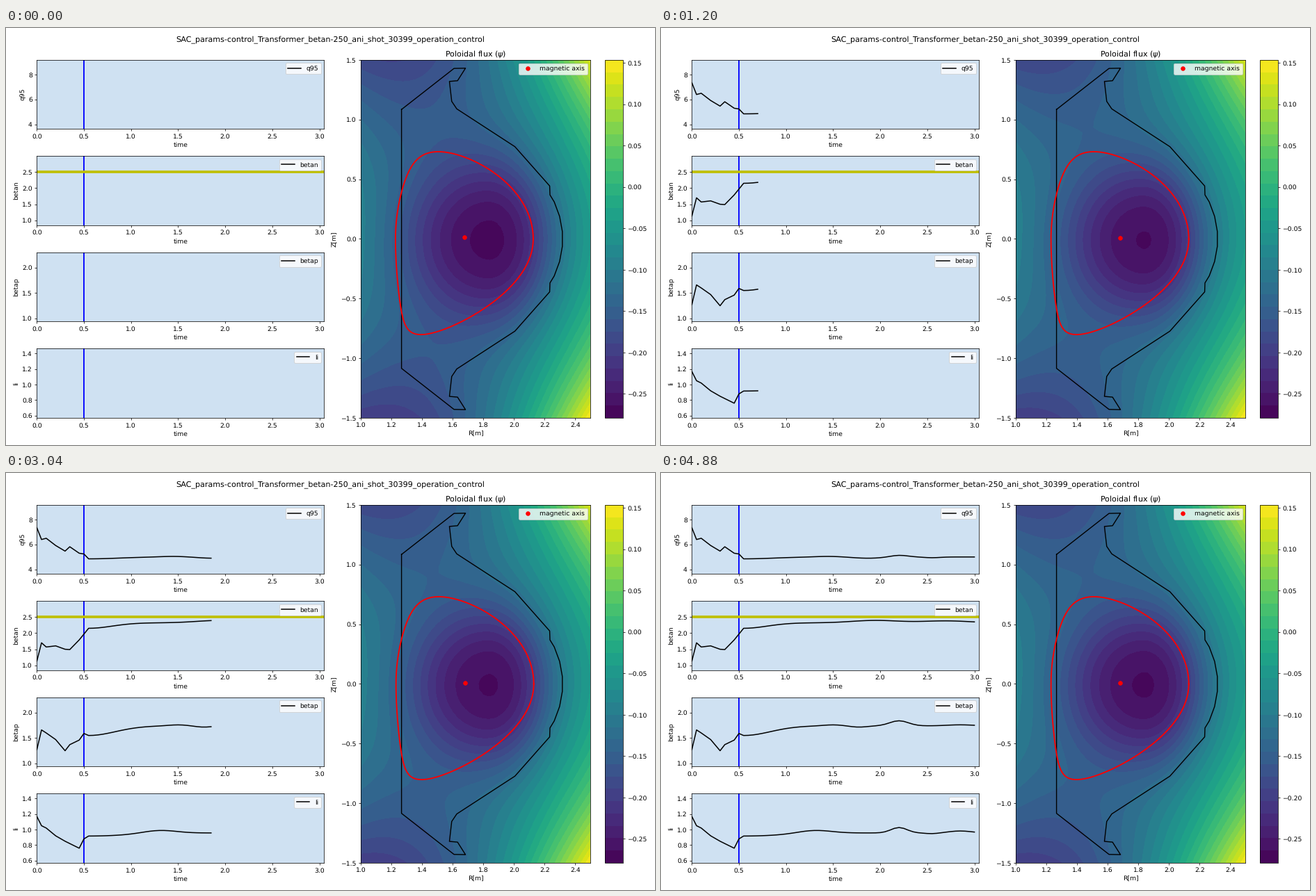
Animation, 933 px wide and 600 px high, one loop 4.96 s. Source, as a matplotlib script:

```python
import numpy as np
import matplotlib.pyplot as plt
from matplotlib.animation import FuncAnimation

FRAMES = 62
W, H = 933.38, 600.03
LOW, HIGH = -0.279, 0.1537
LEVELS = np.linspace(LOW, HIGH, 30)
TIME = np.arange(FRAMES - 1) * 0.05
START = [0, 0.05, 0.1, 0.2, 0.3, 0.35, 0.45, 0.5, 0.55]

# Upper half of the limiter; the lower half mirrors it
WALL = np.array([
    (1.265, 1.085), (1.608, 1.429), (1.683, 1.431), (1.631, 1.326),
    (1.578, 1.32), (1.593, 1.153), (1.626, 1.09), (2.006, 0.773),
    (2.233, 0.444), (2.235, 0.369), (2.263, 0.31), (2.298, 0.189),
    (2.316, 0.062)])


def bump(center, width):
    return np.exp(-((TIME - center) / width)**2)


def trace(start, base, gain, width, ripple):
    """Jagged ramp-up, then a smooth rise with ripples on top."""
    flat = base + gain * (1 - bump(0.55, width)) + ripple
    return np.where(TIME < 0.54, np.interp(TIME, START, start), flat)


SIGNALS = {
    "q95": trace([7.35, 6.4, 6.5, 5.92, 5.47, 5.82, 5.3, 5.24, 4.86],
                 4.85, 0.15, 0.45,
                 0.05 * bump(1.45, 0.2) - 0.1 * bump(1.87, 0.22)
                 + 0.14 * bump(2.2, 0.13) - 0.06 * bump(2.55, 0.12)),
    "betan": trace([1.13, 1.7, 1.57, 1.605, 1.5, 1.49, 1.79, 1.97, 2.15],
                   2.15, 0.17, 0.35,
                   0.075 * bump(1.95, 0.35) + 0.06 * bump(2.7, 0.35)),
    "betap": trace([1.27, 1.66, 1.6, 1.47, 1.25, 1.37, 1.46, 1.59, 1.55],
                   1.55, 0.19, 0.4,
                   0.02 * bump(1.5, 0.15) - 0.025 * bump(1.77, 0.13)
                   + 0.1 * bump(2.2, 0.14) + 0.02 * bump(2.85, 0.2)),
    "li": trace([1.17, 1.05, 1.02, 0.92, 0.85, 0.82, 0.76, 0.88, 0.93],
                0.917, 0.04, 0.6,
                0.04 * bump(1.3, 0.25) + 0.07 * bump(2.2, 0.12)
                - 0.01 * bump(2.55, 0.1) + 0.025 * bump(2.85, 0.17)),
}


def px_axes(left, top, right, bottom):
    return fig.add_axes([left / W, 1 - bottom / H,
                         (right - left) / W, (bottom - top) / H])


def early(frame):
    """Strength of the start-up transient."""
    return np.interp(frame, [0, 5, 15], [0.7, 1, 0])


def boundary(frame):
    """D-shaped plasma edge, more pointed below than above."""
    a = np.linspace(0, 2 * np.pi, 240)
    upper = np.sin(a) > 0
    tilt = np.where(upper, 0.388, 0.681)
    r = (1.679 - 0.005 * early(frame) + 0.45 * np.cos(a + tilt * np.sin(a))
         + 0.013 * np.sin(2 * a)**2)
    return r, np.where(upper, 0.731, 0.802) * np.sin(a)


def psi(frame):
    """Plasma well sunk into a saddle-shaped vacuum field."""
    e = early(frame)
    floor = np.interp(frame, [0, 5, 15, 23, 38, 49, 61],
                      [0.026, 0.0335, 0.033, 0.026, 0.032, 0.0285, 0.031])
    s = R - 1
    field = (0.44 - 0.3 * s + 0.253 * s**2
             + Z**2 * (-0.107 + 0.104 * s + 0.06 * s**2)
             + Z * (0.012 - 0.02 * s)
             - 0.04 * e * np.sin(np.pi * s / 1.5))
    dr = R - 1.843
    dr = dr / np.where(dr < 0, 0.51, 0.375)
    dz = (Z + 0.01) / 0.655
    well = np.exp(-(np.hypot(dr, dz) / (1 + 0.05 * e))**2.6)
    u = field * (1 - well) + floor * well
    return LOW + (HIGH - LOW) * np.clip(u, 0.001, 0.999)


def draw_flux(frame):
    return ax.contourf(R, Z, psi(frame), levels=LEVELS, cmap="viridis")


plt.rcParams["text.hinting"] = "none"
fig = plt.figure(figsize=(14, 9), dpi=66.67)
fig.suptitle("SAC_params-control_Transformer_betan-250_ani_shot_30399"
             "_operation_control", y=0.981)

curves = []
for i, (name, values) in enumerate(SIGNALS.items()):
    top = 45.7 + 138.6 * i
    sub = px_axes(44.3, top, 457.3, top + 99.6)
    sub.set_facecolor("#cfe1f2")
    sub.axvline(0.5, color="b", lw=2)
    if name == "betan":
        sub.axhline(2.5, color="y", lw=4)
    line, = sub.plot([], [], "k", lw=1.65, label=name)
    curves.append((line, values))
    sub.set(xlim=(0, 3.05), ylim=(0.75 * values.min(), 1.25 * values.max()),
            xlabel="time", ylabel=name)
    sub.legend(loc="upper right")

R, Z = np.meshgrid(np.linspace(1, 2.5, 65), np.linspace(-1.5, 1.5, 65))
ax = px_axes(510.3, 46, 840.3, 561)
ax.set_title(r"Poloidal flux ($\psi$)")
flux = draw_flux(0)
bar = fig.colorbar(flux, cax=px_axes(861.3, 46, 887, 561),
                   ticks=np.linspace(-0.25, 0.15, 9))
bar.minorticks_off()

wall = np.vstack([WALL, WALL[::-1] * (1, -1), WALL[:1]])
ax.plot(*wall.T, "k")
edge, = ax.plot([], [], "r", lw=2)
axis_dot, = ax.plot([], [], "ro", label="magnetic axis")
ax.set(xlim=(1, 2.5), ylim=(-1.5, 1.5), xlabel="R[m]", ylabel="Z[m]")
ax.legend(loc="upper right")


def update(frame):
    global flux
    for line, values in curves:
        line.set_data(TIME[:frame], values[:frame])
    flux.remove()
    flux = draw_flux(frame)
    edge.set_data(*boundary(frame))
    e = early(frame)
    axis_dot.set_data([1.681 - 0.009 * e], [0.011 + 0.005 * e])


anim = FuncAnimation(fig, update, frames=FRAMES, interval=80, repeat=True)
plt.show()
```
